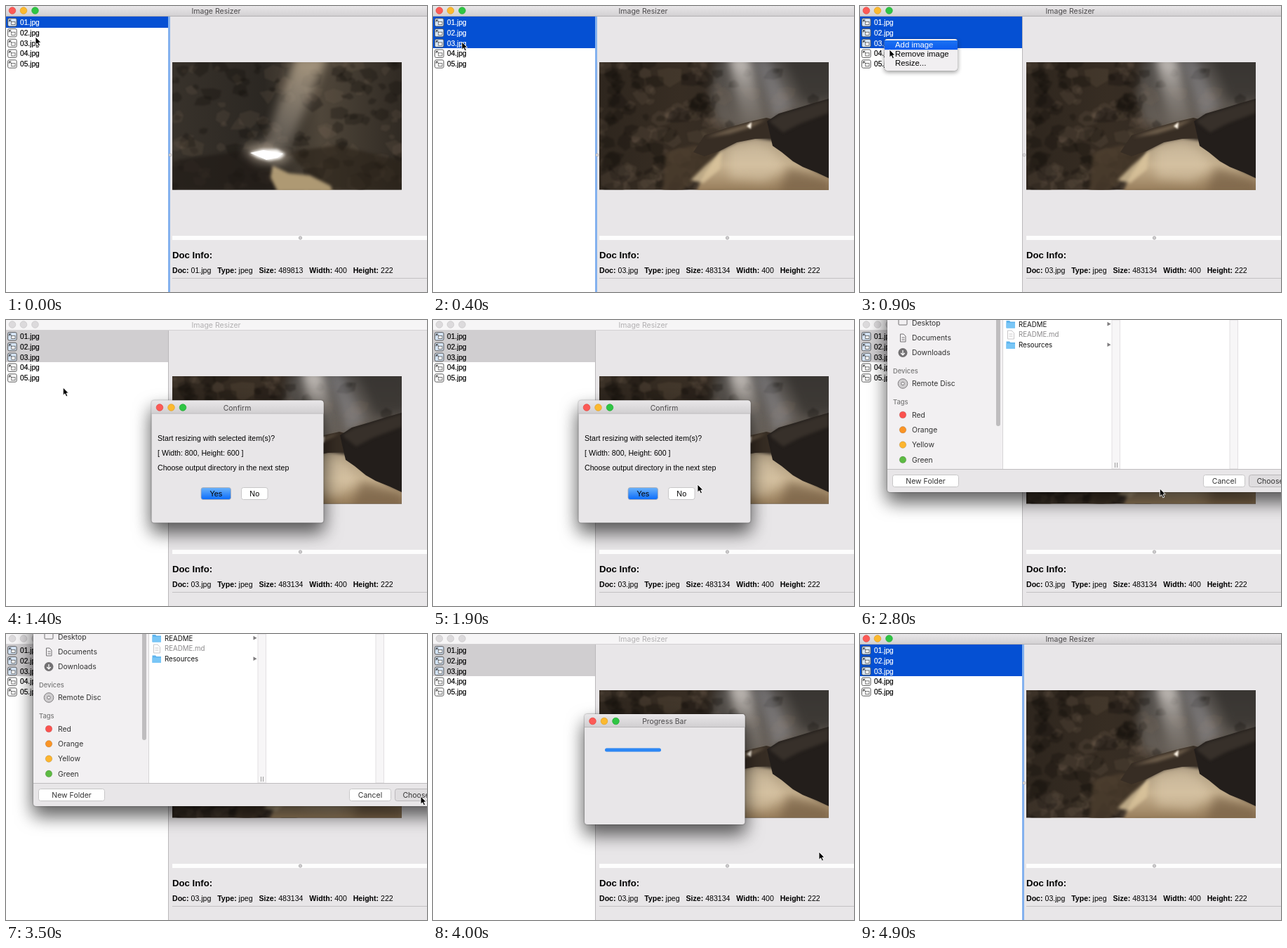
These frames come from a looping animation (600x407 px, 5 s). An HTML page:

```html
<!DOCTYPE html>
<html lang="en">
<head>
<meta charset="utf-8">
<title>Image Resizer</title>
<style>
  html, body { margin: 0; width: 100%; height: 100%; overflow: hidden; background: #e8e6e8; }
  #stage { display: block; width: 600px; height: 407px; }
  text { font-family: "Liberation Sans", Arial, sans-serif; white-space: pre; }
  .ui { font-family: Inter, Roboto, sans-serif; }
  .mid { text-anchor: middle; }
  .b { font-weight: bold; }
  .crisp { shape-rendering: crispEdges; }
  .shadow { filter: drop-shadow(0 13px 13px rgba(0,0,0,.5)) drop-shadow(0 0 1px rgba(0,0,0,.5)); }
  .popup { filter: drop-shadow(0 2px 3px rgba(0,0,0,.28)) drop-shadow(0 0 .6px #555); }
  .edge { filter: blur(.8px); }
  .soft { filter: blur(2px); }
  .haze { filter: blur(7px); }
</style>
</head>
<body>
<svg id="stage" viewBox="0 0 600 407" xmlns="http://www.w3.org/2000/svg">
  <defs>
    <linearGradient id="bar" x2="0" y2="1"><stop stop-color="#e9e7e9"/><stop offset="1" stop-color="#d1cfd1"/></linearGradient>
    <linearGradient id="blue" x2="0" y2="1"><stop stop-color="#6cb3fa"/><stop offset="1" stop-color="#0a6cfb"/></linearGradient>
    <linearGradient id="pick" x2="0" y2="1"><stop stop-color="#1c72f2"/><stop offset="1" stop-color="#0a5bee"/></linearGradient>
    <linearGradient id="wallA"><stop stop-color="#38322b"/><stop offset=".4" stop-color="#2b2722"/><stop offset=".65" stop-color="#4f463a"/><stop offset="1" stop-color="#302a23"/></linearGradient>
    <linearGradient id="wallB"><stop stop-color="#2e261e"/><stop offset=".35" stop-color="#372d23"/><stop offset="1" stop-color="#2b2623"/></linearGradient>
    <linearGradient id="beam" x2="0" y2="1"><stop stop-color="#c8b598" stop-opacity=".75"/><stop offset="1" stop-color="#b4aca3" stop-opacity=".3"/></linearGradient>
    <linearGradient id="mist" x2="0" y2="1"><stop stop-color="#4b4845"/><stop offset="1" stop-color="#696159"/></linearGradient>
    <linearGradient id="ray" x2="0" y2="1"><stop stop-color="#efe9e4" stop-opacity=".8"/><stop offset=".6" stop-color="#b9b3ae" stop-opacity=".4"/><stop offset="1" stop-color="#aca59d" stop-opacity=".1"/></linearGradient>
    <linearGradient id="sand" x2="0" y2="1"><stop stop-color="#a8977d"/><stop offset=".5" stop-color="#c9b492"/><stop offset="1" stop-color="#957b59"/></linearGradient>
  </defs>
</svg>
<script>
const svg = document.getElementById('stage');
const LOOP = 5000, STEP = 100;

function add(parent, tag, attrs = {}, text) {
  const e = document.createElementNS(svg.namespaceURI, tag);
  for (const k in attrs) e.setAttribute(k, attrs[k]);
  if (text !== undefined) e.textContent = text;
  parent.appendChild(e);
  return e;
}
const group = (p = svg, attrs) => add(p, 'g', attrs);
const rect = (p, x, y, width, height, fill, more) => add(p, 'rect', { x, y, width, height, fill, ...more });
const poly = (p, points, fill, cls = '') => add(p, 'polygon', { points, fill, class: cls });
const dot = (p, cx, cy, r, fill, more) => add(p, 'circle', { cx, cy, r, fill, ...more });
const label = (p, x, y, s, size, fill = '#000', cls = '', more) =>
  add(p, 'text', { x, y, 'font-size': size, fill, class: cls, ...more }, s);
const line = (p, d, stroke, w = 1) => add(p, 'path', { d, stroke, 'stroke-width': w, fill: 'none' });
const show = (e, on) => { e.style.display = on ? '' : 'none'; };

function lights(p, xs, y, on = true) {
  const colors = on ? ['#fc5a56', '#fcb92f', '#2fc544'] : ['#dcdadc', '#dcdadc', '#dcdadc'];
  const rims = on ? ['#e2463f', '#dfa023', '#1fa932'] : ['#c6c4c6', '#c6c4c6', '#c6c4c6'];
  xs.forEach((x, i) => dot(p, x, y, 4.8, colors[i], { stroke: rims[i], 'stroke-width': .7 }));
}

function titleBar(on) {
  const g = group();
  rect(g, 0, 0, 600, 15, on ? 'url(#bar)' : '#f6f5f6');
  rect(g, 0, 14, 600, 1, on ? '#b3b1b3' : '#d3d1d3');
  lights(g, [9, 25, 41.5], 6.5, on);
  label(g, 299.5, 10.5, 'Image Resizer', 10.5, on ? '#4c4a4c' : '#b2b0b2', 'ui mid');
  return g;
}

// Photos

function random(seed) {
  return () => (seed = (seed * 16807) % 2147483647) / 2147483647;
}

function rocks(p, count, seed, w) {
  const rnd = random(seed), g = group(p, { class: 'edge' });
  for (let i = 0; i < count; i++) {
    const cx = rnd() * w, cy = rnd() * 182, r = 5 + rnd() * 15, pts = [];
    for (let a = 0; a < 6; a++) {
      const d = r * (.5 + rnd() * .6), q = a * Math.PI / 3 + .5;
      pts.push((cx + d * Math.cos(q)).toFixed(1) + ',' + (cy + d * .8 * Math.sin(q)).toFixed(1));
    }
    const lit = rnd() > .5;
    add(g, 'polygon', { points: pts.join(' '), fill: lit ? '#7d6c57' : '#0d0a08', opacity: lit ? .17 : .28 });
  }
}

const photo = () => add(svg, 'svg', { x: 237, y: 80, width: 327, height: 181.5, viewBox: '0 0 327 181.5' });

function cave() {
  const p = photo();
  rect(p, 0, 0, 327, 182, 'url(#wallA)');
  rocks(p, 150, 77, 327);
  poly(p, '0,140 110,125 145,150 150,182 0,182', '#201b16b0', 'soft');
  poly(p, '165,128 235,118 327,140 327,182 225,182 195,160', '#2a2219a0', 'soft');
  poly(p, '175,-8 222,-8 165,122 130,122', 'url(#beam)', 'haze');
  poly(p, '143,147 166,158 196,161 226,176 228,184 150,184 140,164', '#ae9973', 'soft');
  poly(p, '100,124 132,115 172,130 155,145 120,142', '#d2c5b2a0', 'haze');
  poly(p, '110,129 128,124 150,124 161,131 154,137 138,140 122,136', '#fffefb', 'soft');
  poly(p, '111,129 130,125 158,130 150,136 134,139', '#ffffff');
  return p;
}

function arch() {
  const p = photo();
  rect(p, 0, 0, 327, 182, 'url(#wallB)');
  poly(p, '168,-8 335,-8 335,60 250,95 195,98 165,85 158,45', 'url(#mist)', 'haze');
  poly(p, '262,-8 335,-8 335,52 290,58', '#2e2a27a0', 'haze');
  rocks(p, 110, 421, 175);
  rocks(p, 40, 95, 327);
  poly(p, '184,-8 214,-8 236,85 205,92', 'url(#ray)', 'haze');
  poly(p, '218,-8 240,-8 275,62 250,82', '#a9abb160', 'haze');
  poly(p, '138,184 150,158 172,126 198,113 222,108 250,112 276,138 310,156 330,164 330,184', 'url(#sand)', 'soft');
  poly(p, '185,122 222,113 245,122 265,150 235,170 185,165', '#dfcdb080', 'haze');
  poly(p, '270,150 330,168 330,186 255,186', '#6b543c90', 'haze');
  poly(p, '95,128 135,118 172,124 158,146 140,162 118,184 90,184', '#4d3f2fc0', 'soft');
  poly(p, '130,168 150,148 175,126 172,152 148,172', '#dbc59cd0', 'soft');
  poly(p, '134,128 150,104 180,94 216,84 238,79 250,82 250,108 222,109 196,114 172,126 150,134', '#372d24');
  poly(p, '152,107 185,95 220,85 238,81 216,93 186,102', '#8d7a61a0', 'soft');
  poly(p, '210,91 217,85 216,95', '#fff6e8', 'edge');
  poly(p, '239,84 256,73 280,66 306,58 327,52 327,165 310,157 290,149 276,141 260,128 247,119', '#231e1b');
  poly(p, '242,84 258,74 282,67 327,53 327,72 285,88 262,100', '#443b34a0', 'soft');
  return p;
}

// Main window

rect(svg, 0, 0, 600, 407, '#e8e6e8');
rect(svg, 0, 15, 231, 392, '#fff');
rect(svg, 231, 15, 1, 392, '#bab8ba');
const ring = rect(svg, 231, 14, 3, 393, '#83b1ee');
dot(svg, 234, 212, 2, '#dddbdd', { stroke: '#aaa8aa', 'stroke-width': .7 });
const barOn = titleBar(true), barOff = titleBar(false);

const mark = rect(svg, 0, 15, 231, 16, '#0550d3', { class: 'crisp' });
const rows = [1, 2, 3, 4, 5].map((n, i) => {
  const g = group(svg, { transform: `translate(0 ${15.6 + i * 14.8})` });
  const icon = rect(g, 2.6, 2, 12.6, 11.4, '#fff', { rx: 2, stroke: '#4a4a4a', 'stroke-width': .9 });
  rect(g, 7.8, 6.8, 5.2, 4.2, '#fff', { stroke: '#555', 'stroke-width': .8 });
  line(g, 'M4.6 7V4.3H7.4M4.6 4.3L8 7', '#333', .9);
  const name = label(g, 20, 11.4, `0${n}.jpg`, 10.2, '#000', '', { 'stroke-width': .2 });
  return { icon, name };
});

const photoA = cave(), photoB = arch();

rect(svg, 237, 327, 363, 6, '#fdfdfd');
dot(svg, 419.5, 330, 2.2, '#cfcdcf', { stroke: '#a3a1a3', 'stroke-width': .7 });
label(svg, 237, 359, 'Doc Info:', 13.2, '#000', 'b');
const info = label(svg, 237, 379.5, '', 10.6);
const fields = ['Doc:', 'Type:', 'Size:', 'Width:', 'Height:'].map((s, i) => {
  add(info, 'tspan', { class: 'b' }, (i ? '\u00a0\u00a0\u00a0' : '') + s);
  return add(info, 'tspan');
});
rect(svg, 237, 387, 363, 1, '#c3c1c3');

// Context menu

const menu = group();
rect(menu, 35, 47, 104, 45, '#f1eff1', { rx: 4, class: 'popup' });
const pick = rect(menu, 35, 49, 104, 13.2, 'url(#pick)');
const items = ['Add image', 'Remove image', 'Resize...'].map((s, i) => label(menu, 50, 59 + i * 13.1, s, 11.4));

// Dialogs

function dialog(x, y, w, h, title) {
  const g = group();
  rect(g, x, y, w, h, '#e8e6e8', { rx: 4, class: 'shadow' });
  add(g, 'path', { d: `M${x} ${y + 18}v-14q0-4 4-4h${w - 8}q4 0 4 4v14z`, fill: 'url(#bar)' });
  rect(g, x, y + 18, w, 1, '#b8b6b8');
  lights(g, [x + 11.5, x + 28, x + 44.5], y + 10);
  label(g, x + w / 2 - .5, y + 14, title, 10.4, '#4c4a4c', 'ui mid');
  return g;
}

function button(p, x, y, w, h, s, fill = '#fff', cls = 'mid', size = 10.8) {
  rect(p, x, y, w, h, fill, { rx: 3, stroke: fill === '#fff' ? '#bdbbbd' : '#b0aeb0', 'stroke-width': .8 });
  label(p, x + w / 2, y + h / 2 + 3.5, s, size, cls === 'mid' ? '#000' : '#333', cls);
}

const confirmBox = dialog(207.5, 114.5, 245, 174, 'Confirm');
['Start resizing with selected item(s)?', '[ Width: 800, Height: 600 ]', 'Choose output directory in the next step']
  .forEach((s, i) => label(confirmBox, 216, 171.5 + i * 21.3, s, 10.6));
button(confirmBox, 278, 238.5, 42.5, 17, 'Yes', 'url(#blue)');
button(confirmBox, 335.5, 238.5, 37.5, 17, 'No');

const progress = dialog(216, 114, 228.5, 157, 'Progress Bar');
rect(progress, 245, 162.5, 80, 5, '#d2d0d2', { rx: 2.5 });
const fill = rect(progress, 245, 162.5, 80, 5, '#2c87f5', { rx: 2.5 });

// Folder chooser

const panel = group();
rect(panel, 39, -30, 640, 275, '#e8e6e8', { rx: 4, class: 'shadow' });
rect(panel, 39, 0, 164, 212, '#f2f0f2');
rect(panel, 203, 0, 397, 212, '#fff');
rect(panel, 203, 0, 1, 212, '#d6d4d6');
rect(panel, 194, -10, 6, 161, '#bfbdbf', { rx: 3 });
[359, 527].forEach(x => rect(panel, x, 0, 11.5, 212, '#f7f6f7', { stroke: '#dcdadc', 'stroke-width': .8 }));
line(panel, 'M363.5 203v7M366.5 203v7', '#999');
rect(panel, 39, 212, 561, 1, '#bfbdbf');

const place = (s, y) => label(panel, 74, y + 3.7, s, 10.4, '#333', 'ui');
const head = (s, y) => label(panel, 47, y + 3.4, s, 9.4, '#777', 'ui', { 'font-weight': 500 });
[['Desktop', 4], ['Documents', 25], ['Downloads', 46.5], ['Remote Disc', 90.5]].forEach(a => place(...a));
head('Devices', 72.5);
head('Tags', 117);
const gray = '#737173';
rect(panel, 55, -3, 12, 10, 'none', { stroke: gray, rx: 1 });
line(panel, 'M57.5 20h4.5l3 3v8h-7.5zM59.5 25h4M59.5 28h4', gray);
dot(panel, 61, 46.5, 6.5, gray);
line(panel, 'M61 43v6.5M58.2 47l2.8 2.8 2.8-2.8', '#fff', 1.3);
dot(panel, 61, 90.5, 6.8, '#cfcdcf', { stroke: gray, 'stroke-width': .9 });
dot(panel, 61, 90.5, 2.2, '#f2f0f2', { stroke: gray, 'stroke-width': .9 });
[['Red', '#fb524f'], ['Orange', '#fa9426'], ['Yellow', '#fdb52f'], ['Green', '#5dba43']].forEach(([s, c], i) => {
  const y = 135 + i * 21.3;
  dot(panel, 61, y, 4.8, c, { stroke: '#0002' });
  place(s, y);
});

function folder(s, y) {
  add(panel, 'path', { d: `M208.5 ${y - 5}h4.5l1.5 1.5h6.5v9h-12.5z`, fill: '#5eb4ee' });
  rect(panel, 208.5, y - 2, 12.5, 7.5, '#79c6f6', { rx: .8 });
  label(panel, 226, y + 3.6, s, 9.7, '#111', 'ui');
  poly(panel, `352.5,${y - 3.2} 357.5,${y - .3} 352.5,${y + 2.6}`, '#7d7b7d');
}
folder('README', 6);
folder('Resources', 35.5);
line(panel, 'M210.5 15h5.5l3.5 3.5v8.5h-9zM212.5 20h5M212.5 23h5', '#c8c6c8');
label(panel, 226, 24.2, 'README.md', 9.7, '#8b898b', 'ui');
button(panel, 46.5, 220.5, 94, 17, 'New Folder', '#fff', 'ui mid', 10.5);
button(panel, 489.5, 220.5, 59, 17, 'Cancel', '#fff', 'ui mid', 10.5);
button(panel, 554.5, 220.5, 60, 17, 'Choose', '#dfdddf', 'ui mid', 10.5);

// Pointers

const arrow = group();
add(arrow, 'path', { d: 'M0 0V11.2L2.6 8.8L4.5 13L6.5 12.1L4.7 8H8z', fill: '#000', stroke: '#fff', 'stroke-width': .9 });
const sizer = group();
add(sizer, 'path', { d: 'M0-6.5L3.4-2.6H.9V2.6H3.4L0 6.5L-3.4 2.6H-.9V-2.6H-3.4z', fill: '#000', stroke: '#fff', 'stroke-width': .9 });

// Timeline

const scenes = [[0, 'main'], [700, 'menu'], [1300, 'main'], [1400, 'confirm'], [2500, 'main'],
  [2800, 'panel'], [3700, 'main'], [3800, 'progress'], [4200, 'main']];
const SELECT = 300, HIDE = 4300;
const path = [[0, 42, 44], [200, 41, 51], [400, 41, 51], [700, 35, 47], [900, 42, 62], [1100, 47, 78],
  [1300, 47, 80], [1800, 377, 234], [1900, 377, 234], [2200, 302, 245], [2400, 302, 245],
  [2600, 370, 243], [3200, 591, 231], [3700, 591, 231], [4000, 550, 310], [4300, 572, 345]];

function pointer(t) {
  const i = path.findIndex(p => p[0] > t);
  if (i < 0) return path[path.length - 1].slice(1);
  const [t0, x0, y0] = path[i - 1], [t1, x1, y1] = path[i];
  const k = (t - t0) / (t1 - t0), e = k * k * (3 - 2 * k);
  return [x0 + (x1 - x0) * e, y0 + (y1 - y0) * e];
}

function draw(t) {
  const scene = scenes.filter(s => s[0] <= t).pop()[1];
  const active = scene === 'main' || scene === 'menu';
  const many = t >= SELECT, count = many ? 3 : 1;
  show(ring, scene === 'main');
  show(barOn, active);
  show(barOff, !active);
  show(photoA, !many);
  show(photoB, many);
  mark.setAttribute('height', Math.round(14.8 * count) + 1);
  mark.setAttribute('fill', active ? '#0550d3' : '#d0ced0');
  rows.forEach(({ icon, name }, i) => {
    const on = i < count, ink = on && active ? '#fff' : '#000';
    icon.setAttribute('fill', on ? '#d5e4f5' : '#fff');
    name.setAttribute('fill', ink);
    name.setAttribute('stroke', ink);
  });
  const doc = many ? ['03.jpg', 'jpeg', '483134', '400', '222'] : ['01.jpg', 'jpeg', '489813', '400', '222'];
  fields.forEach((f, i) => { f.textContent = '\u00a0' + doc[i]; });

  const [x, y] = pointer(t);
  const row = Math.floor((y - 49) / 13.2);
  show(menu, scene === 'menu');
  show(pick, row >= 0);
  pick.setAttribute('y', 49 + Math.max(0, row) * 13.1);
  items.forEach((e, i) => e.setAttribute('fill', i === row ? '#fff' : '#000'));

  show(confirmBox, scene === 'confirm');
  show(panel, scene === 'panel');
  show(progress, scene === 'progress');
  fill.setAttribute('width', 80 * Math.max(0, Math.min(1, (t - 3700) / 300)));

  const sizing = t >= 2500 && t < 2800;
  show(arrow, t < HIDE && !sizing);
  show(sizer, sizing);
  (sizing ? sizer : arrow).setAttribute('transform', `translate(${x} ${y})`);
}

const start = performance.now();
let last = -1;
function tick() {
  const t = Math.floor(((performance.now() - start) % LOOP) / STEP) * STEP;
  if (t !== last) draw(last = t);
  requestAnimationFrame(tick);
}
tick();
</script>
</body>
</html>
```
